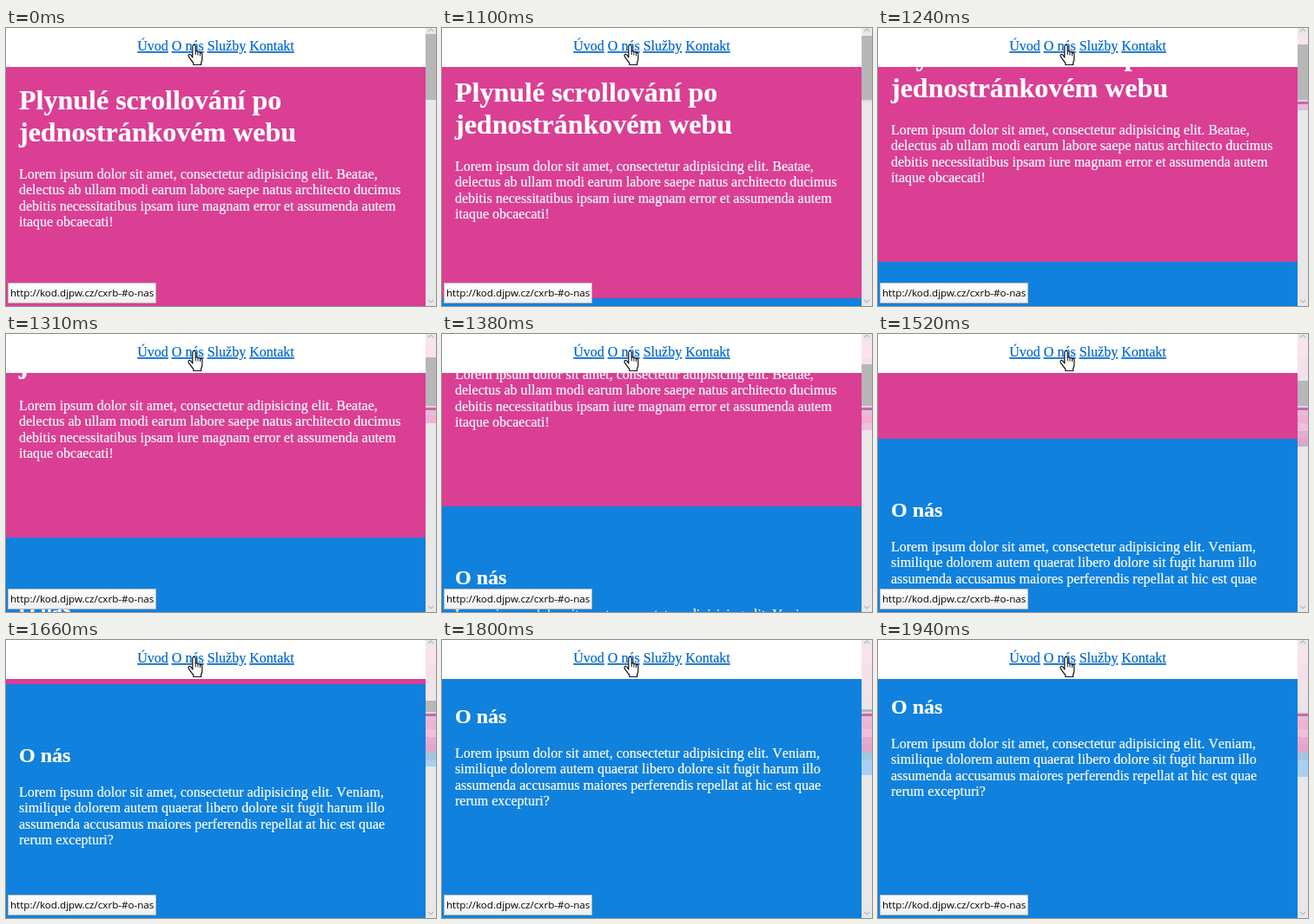
Write an HTML page that moves like this. It is 495 by 321 pixels and loops after 2510 ms.

```html
<!DOCTYPE html>
<html lang="cs">
<head>
<meta charset="utf-8">
<style>
  html, body { margin: 0; width: 100%; height: 100%; overflow: hidden; background: #fff; }
  svg { display: block; }
  text { font: 16px "Liberation Serif", "Times New Roman", serif; font-kerning: none; fill: #fff; stroke: #fff; stroke-width: .2; }
  .h1 { font-size: 32px; font-weight: bold; }
  .h2 { font-size: 24px; font-weight: bold; }
  .nav { fill: #06c; stroke: #06c; text-anchor: middle; }
  .nav tspan { text-decoration: underline; }
  .url { font: 11.6px "Open Sans", "Noto Sans", sans-serif; fill: #000; stroke: none; }
  .arrow { fill: none; stroke: #b8b8b8; stroke-width: 1.2; }
</style>
</head>
<body>
<svg width="495" height="321" viewBox="0 0 495 321">
  <defs>
    <linearGradient id="tip" x2="0" y2="1">
      <stop stop-color="#fff"/><stop offset="1" stop-color="#f0f0f0"/>
    </linearGradient>
    <clipPath id="reveal"><rect id="revealBox" x="483" y="83" width="12" height="0"/></clipPath>
  </defs>

  <g id="page">
    <rect width="483" height="321" fill="#da3f94"/>
    <rect y="321" width="483" height="330" fill="#1081dd"/>
  </g>

  <rect width="483" height="45" fill="#fff"/>
  <text class="nav" x="241.5" y="26"><tspan>Úvod</tspan> <tspan>O nás</tspan> <tspan>Služby</tspan> <tspan>Kontakt</tspan></text>

  <rect x="483" width="12" height="321" fill="#e8e8e8"/>
  <path class="arrow" d="M486 4l3-3 3 3M486 314l3 3 3-3"/>
  <rect x="483" y="7" width="12" height="76" fill="#b7b7b7"/>
  <g id="trail"></g>
  <g id="bands" clip-path="url(#reveal)"></g>

  <rect x="2.5" y="294.5" width="170" height="23" fill="url(#tip)" stroke="#b8b8b8"/>
  <text class="url" x="5" y="310">http://kod.djpw.cz/cxrb-#o-nas</text>

  <g transform="translate(-.7 0)" stroke="#111">
    <path fill="#fff" stroke-width="1.2" stroke-linejoin="round"
      d="M215.500 34V21.300q0-1.900 1.700-1.900t1.700 1.900V27q1.600-1 2.700.600 1.700-.800 2.600.900 2.300-.500 2.300 2V36q0 2-1.200 3.700V42.500H216.500V40.500Q214 37.500 211 33.200q-1-1.700.300-2.600 1.600-.700 2.700 1.100z"/>
    <path fill="none" d="M218.900 27v4M221.600 28v3.500M224.200 29v3"/>
  </g>
</svg>
<script>
const $ = id => document.getElementById(id);
const LOOP = 2510, START = 1100, STEP = 70;
// Scroll offset after each step of the swing-eased scroll
const OFFSETS = [9, 27, 51, 86, 122, 160, 200, 241, 270, 297, 315, 325, 326];

function add(parent, tag, attrs, text = '') {
  const el = document.createElementNS('http://www.w3.org/2000/svg', tag);
  for (const key in attrs) el.setAttribute(key, attrs[key]);
  el.textContent = text;
  return parent.appendChild(el);
}

function lines(y, gap, cls, rows) {
  rows.forEach((row, i) =>
    add($('page'), 'text', { x: 15, y: Math.round(y + i * gap), class: cls }, row));
}

lines(94, 36.6, 'h1', ['Plynulé scrollování po', 'jednostránkovém webu']);
lines(174, 18.4, '', [
  'Lorem ipsum dolor sit amet, consectetur adipisicing elit. Beatae,',
  'delectus ab ullam modi earum labore saepe natus architecto ducimus',
  'debitis necessitatibus ipsam iure magnam error et assumenda autem',
  'itaque obcaecati!'
]);
lines(411, 0, 'h2', ['O nás']);
lines(451, 18.4, '', [
  'Lorem ipsum dolor sit amet, consectetur adipisicing elit. Veniam,',
  'similique dolorem autem quaerat libero dolore sit fugit harum illo',
  'assumenda accusamus maiores perferendis repellat at hic est quae',
  'rerum excepturi?'
]);

function stripes(parent, y, list) {
  for (const [end, fill] of list) {
    add(parent, 'rect', { x: 483, y, width: 12, height: end - y, fill });
    y = end;
  }
}

stripes($('bands'), 83, [
  [85, '#e4d3de'], [88, '#c568ae'], [94, '#e6bcd6'], [103, '#efb2d4'], [112, '#eec0dc'],
  [120, '#e8a9cf'], [129, '#dfa6cc'], [138, '#a5c4de'], [158, '#a9d0f2']
]);

// Tint left behind above the moving thumb
function drawTrail(top) {
  const trail = $('trail');
  trail.replaceChildren();
  const tints = [[27, '#f9e3ef'], [45, '#f4e0ea'], [70, '#f0e4ea'], [83, '#e9e5e8']];
  let from = 7;
  for (const [end, fill] of tints) {
    const to = Math.min(end, top);
    if (to > from) stripes(trail, from, [[to, fill]]);
    from = end;
  }
}

function draw(now) {
  const n = Math.floor((now % LOOP - START) / STEP);
  const scroll = n < 0 ? 0 : OFFSETS[Math.min(n, OFFSETS.length - 1)];
  const top = Math.round(7 + scroll * 0.233);
  $('page').setAttribute('transform', `translate(0 ${-scroll})`);
  $('revealBox').setAttribute('height', top - 7);
  drawTrail(top);
}

const begin = performance.now();
function tick() {
  draw(performance.now() - begin);
  requestAnimationFrame(tick);
}
tick();
</script>
</body>
</html>
```
